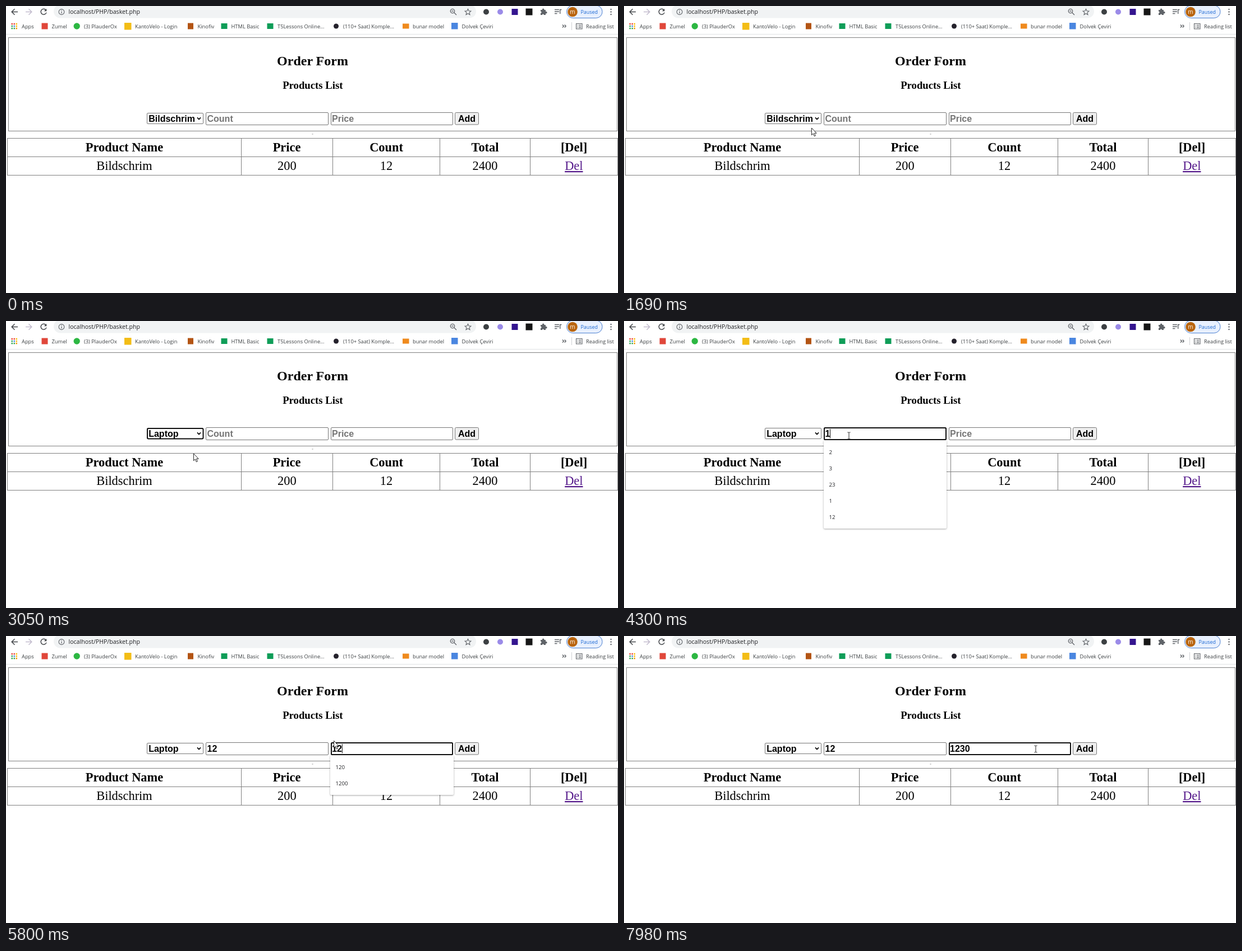
Animation of 1091x513 px, one loop 8000 ms. Source, as an HTML page:

```html
<!DOCTYPE html>
<html lang="en">
<head>
<meta charset="utf-8">
<title>Order Form</title>
<style>
  html, body { margin: 0; width: 100%; height: 100%; overflow: hidden; background: #fff; }
  svg { display: block; }
  .ui { font: 9.3px "Open Sans", "Noto Sans", sans-serif; fill: #3c4043; }
  .url { font-size: 10.6px; fill: #202124; }
  .page { font: 22.4px "Liberation Serif", Times, serif; text-anchor: middle; }
  .bold { font-weight: bold; }
  .form { font: bold 16px "Liberation Sans", Arial, sans-serif; }
  .hint { fill: #757575; }
  .line { fill: none; stroke: #808080; }
  .field { fill: #fff; stroke: #767676; }
  .ring { fill: none; stroke: #101010; stroke-width: 2; }
  .icon { fill: none; stroke: #5f6368; stroke-width: 1.5; }
  .list { font: 9.6px "Open Sans", "Noto Sans", sans-serif; fill: #202124; }
  .sheet { fill: #fff; filter: drop-shadow(0 1px 1.5px rgba(0, 0, 0, .35)); }
</style>
</head>
<body>
<svg width="1091" height="513" viewBox="0 0 1091 513">
  <!-- toolbar -->
  <rect x="85" y="-2" width="753" height="23.5" rx="11.7" fill="#f1f3f4"/>
  <g class="icon">
    <path d="M21 10.5H10.5M15.5 5.2L10.2 10.5L15.5 15.8" stroke="#44474b"/>
    <path d="M35 10.5H45.5M40.5 5.2L45.8 10.5L40.5 15.8" stroke="#c3bcce"/>
    <path d="M71.2 7.2A5 5 0 1 0 72 11.6" stroke="#44474b"/>
    <path d="M72.3 4.8V9.3H67.8Z" fill="#44474b" stroke="none"/>
    <circle cx="99" cy="10.5" r="4.9" stroke-width="1.1"/>
    <path d="M99 9.7V13.2M99 7.3V8.6" stroke-width="1.2"/>
    <circle cx="796" cy="9" r="3.7" stroke-width="1.3"/>
    <path d="M798.8 11.8L803 16M794.3 9H797.7" stroke-width="1.3"/>
    <path d="M823.5 5.3L825.1 8.8L828.9 9.2L826 11.7L826.9 15.5L823.5 13.5L820.1 15.5L821 11.7L818.1 9.2L821.9 8.8Z" stroke-width="1.1"/>
    <path d="M978 6.5H986M978 10H986M978 13.5H982.5M987.7 14V6.5H990.5" stroke-width="1.4"/>
  </g>
  <circle cx="856" cy="10.5" r="5" fill="#3c4043"/>
  <circle cx="881" cy="10.5" r="5" fill="#9b8be8"/>
  <rect x="901.5" y="5" width="11" height="11" fill="#34158f"/>
  <rect x="926.5" y="4.5" width="12" height="12" fill="#161616"/>
  <path d="M953 7H956A1.8 1.8 0 1 1 959.4 7H962V10A1.8 1.8 0 1 1 962 13.2V16H959A1.6 1.6 0 0 0 955.8 16H953V12.8A1.6 1.6 0 0 0 953 9.6Z" fill="#5f6368"/>
  <rect x="999.5" y="-1" width="63.5" height="22.5" rx="11.2" fill="#e8f0fe" stroke="#4a7fd0"/>
  <circle cx="1010" cy="10.5" r="8.8" fill="#b9650f"/>
  <g fill="#5f6368">
    <circle cx="1078.5" cy="6" r="1.2"/><circle cx="1078.5" cy="10.5" r="1.2"/><circle cx="1078.5" cy="15" r="1.2"/>
  </g>
  <g class="ui">
    <text class="url" x="111.5" y="14.2">localhost/PHP/basket.php</text>
    <text x="1010" y="13.6" text-anchor="middle" style="fill:#fff;font-size:10px">m</text>
    <text x="1024.5" y="13.7" style="fill:#1967d2;font-size:8.9px">Paused</text>
  </g>

  <!-- bookmarks -->
  <g id="dots"></g>
  <rect x="63.5" y="30.5" width="11" height="11" fill="#e0473a"/>
  <circle cx="126.2" cy="36" r="5.7" fill="#2cb742"/>
  <rect x="211" y="30" width="12.5" height="12.5" fill="#f3bd16"/>
  <rect x="324" y="30.5" width="10" height="11" fill="#b35413"/>
  <rect x="383.5" y="31" width="11" height="10" fill="#0f9d58"/>
  <rect x="465.5" y="31" width="11" height="10" fill="#0f9d58"/>
  <circle cx="588.5" cy="36" r="4.5" fill="#25222c"/>
  <rect x="707" y="31.5" width="11.5" height="9" fill="#ef8a1d"/>
  <rect x="794" y="30" width="11.5" height="11.5" fill="#4a86e0"/>
  <g class="ui">
    <text x="28" y="39.5">Apps</text>
    <text x="81.5" y="39.5">Zumel</text>
    <text x="139" y="39.5">(3) PlauderOx</text>
    <text x="230" y="39.5">KantoVelo - Login</text>
    <text x="341.5" y="39.5">Kinofiv</text>
    <text x="401.5" y="39.5">HTML Basic</text>
    <text x="484" y="39.5">T5Lessons Online...</text>
    <text x="601" y="39.5">(110+ Saat) Komple...</text>
    <text x="725" y="39.5">bunar model</text>
    <text x="812.5" y="39.5">Dolvek Çeviri</text>
    <text x="1034" y="39.5">Reading list</text>
  </g>
  <path class="icon" d="M992 33.5L994.3 36L992 38.5M995.7 33.5L998 36L995.7 38.5" stroke-width="1.2"/>
  <path d="M1008.5 29V43" stroke="#cfd1d4"/>
  <path class="icon" d="M1016.5 31.5H1027V41H1016.5ZM1018.3 34H1019.6M1018.3 36.3H1019.6M1018.3 38.6H1019.6M1021 34H1025.3M1021 36.3H1025.3M1021 38.6H1025.3" style="stroke-width:1.1"/>
  <path d="M0 50.5H1091" stroke="#dfe1e4"/>

  <!-- page -->
  <rect class="line" x="4.5" y="56.5" width="1085" height="167"/>
  <path d="M545.5 229H547.5" stroke="#909090"/>
  <path class="line" d="M2.5 236.5H1090.5V302H2.5ZM2.5 269H1090.5M419.5 236.5V302M582.5 236.5V302M773.5 236.5V302M934.5 236.5V302" shape-rendering="crispEdges"/>
  <g class="page">
    <g class="bold">
      <text x="546.5" y="105.5" style="font-size:24px">Order Form</text>
      <text x="546.8" y="148" style="font-size:18.72px">Products List</text>
      <text x="211" y="260">Product Name</text>
      <text x="500.5" y="260">Price</text>
      <text x="678" y="260">Count</text>
      <text x="854" y="260">Total</text>
      <text x="1012.5" y="260">[Del]</text>
    </g>
    <text x="211" y="293">Bildschrim</text>
    <text x="500.8" y="293">200</text>
    <text x="678" y="293">12</text>
    <text x="854" y="293">2400</text>
    <text x="1012.3" y="293" fill="#551a8b" text-decoration="underline">Del</text>
  </g>

  <!-- form -->
  <rect class="field" x="251.5" y="191.5" width="100" height="19" rx="1.5"/>
  <rect class="field" x="356.5" y="190.5" width="218" height="22" rx="1.5"/>
  <rect class="field" x="579.5" y="190.5" width="217" height="22" rx="1.5"/>
  <rect x="800.5" y="190.5" width="42" height="21.5" rx="2" fill="#efefef" stroke="#767676"/>
  <path d="M341 199.3L344 202.5L347 199.3" fill="none" stroke="#000" stroke-width="1.7"/>
  <rect class="ring" x="252" y="192" width="99.5" height="18.5" rx="2" data-on="1960-3720"/>
  <rect class="ring" x="357" y="191" width="217" height="21" rx="1.5" data-on="3720-5060"/>
  <rect class="ring" x="580" y="191" width="216" height="21" rx="1.5" data-on="5060-8000"/>
  <g class="form">
    <text id="pick" x="254.2" y="207"></text>
    <text id="count" x="358.5" y="207"></text>
    <text id="price" x="581" y="207"></text>
    <text x="806" y="207">Add</text>
  </g>
  <path id="caret" d="M0 193V209.5" stroke="#000"/>

  <!-- popups -->
  <g class="form" data-on="2150-2970">
    <rect class="sheet" x="251" y="212" width="101" height="121"/>
    <rect class="line" x="251.5" y="212.5" width="100" height="120"/>
    <rect id="mark" x="252" width="99" height="20" fill="#1967d2"/>
    <g id="options"></g>
  </g>
  <g id="list" class="list"></g>

  <g id="cursor">
    <path id="arrow" d="M.5 0V12.7L3.3 10L5.3 14.8L7.4 13.9L5.4 9.3H9.2Z" fill="#fff" stroke="#111" stroke-width=".9"/>
    <path id="beam" d="M-2.5 -6H-.7L0 -5.3L.7 -6H2.5M0 -5.3V5.3M-2.5 6H-.7L0 5.3L.7 6H2.5" fill="none" stroke="#222"/>
  </g>
</svg>
<script>
const LOOP = 8000, HOLD = 70;
const $ = id => document.getElementById(id);
const show = (el, on) => { el.style.visibility = on ? 'inherit' : 'hidden'; };
const stepAt = (steps, t) => steps.filter(s => s[0] <= t).pop()[1];
const setHtml = (el, html) => { if (el.dataset.html !== html) el.innerHTML = el.dataset.html = html; };

const picks = [[0, 'Bildschrim'], [2970, 'Laptop']];
const counts = [[0, ''], [4100, '1'], [4440, '12']];
const prices = [[0, ''], [5460, '1'], [5640, '12'], [6270, '123'], [7360, '1230']];
const options = ['Bildschrim', 'Laptop', 'Maus', 'Tastatur', 'Drucker', 'Kamera'];

// Filter prefix of the open suggestion list; null means closed
const countFilter = [[0, null], [3780, ''], [4370, '1'], [4510, '12'], [4700, null]];
const priceFilter = [[0, null], [5120, ''], [5530, '1'], [5730, '12'], [6540, null]];
const listAlpha = [[0, .5], [3850, 1], [5120, .6], [5190, 1], [6400, .6], [6470, .25]];
const listScale = [[0, 1], [6400, .98], [6470, .96]];

const caretOn = [[0, 0], [3720, 1], [4770, 0], [5060, 1], [6070, 0], [6270, 1],
  [6740, 0], [7090, 1], [7860, 0]];
const cursors = [[0, ''], [320, 'arrow'], [3640, 'beam'], [5660, 'arrow'], [7910, 'beam']];
const path = [
  [320, 706, 464], [560, 540, 320], [860, 322, 145], [1000, 320, 162], [1070, 326, 187],
  [1350, 334, 218], [1690, 334, 218], [1820, 334, 211], [2150, 334, 211], [2400, 334, 228],
  [2660, 334, 237], [3060, 334, 237], [3500, 380, 215], [3710, 401, 205], [4560, 401, 205],
  [4770, 560, 200], [4930, 575, 200], [5040, 593, 199], [5460, 593, 199], [5700, 584, 188],
  [5800, 584, 186], [6250, 584, 186], [6400, 580, 187], [7600, 580, 187], [7760, 640, 167],
  [7900, 724, 188], [7980, 734, 202]
];

function pointAt(t) {
  const i = path.findIndex(p => p[0] > t);
  if (i === 0) return path[0].slice(1);
  if (i < 0) return path[path.length - 1].slice(1);
  const [t0, x0, y0] = path[i - 1], [t1, x1, y1] = path[i];
  const k = (t - t0) / (t1 - t0);
  return [x0 + (x1 - x0) * k, y0 + (y1 - y0) * k];
}

function listHtml(x, w, items) {
  const rows = items.map((s, i) => `<text x="${x + 9.5}" y="${237.5 + 29 * i}">${s}</text>`);
  return `<rect class="sheet" x="${x}" y="213" width="${w}" height="${29 * items.length + 13}" rx="2"/>` + rows.join('');
}

function drawList(t) {
  const c = stepAt(countFilter, t), p = stepAt(priceFilter, t);
  const match = (all, prefix) => all.filter(s => s.startsWith(prefix));
  let html = '';
  if (c !== null) html = listHtml(356, 219, match(['2', '3', '23', '1', '12'], c));
  if (p !== null) html = listHtml(578, 220, match(['200', '120', '10', '20', '1200'], p));
  setHtml($('list'), html);
  $('list').style.opacity = stepAt(listAlpha, t);
  const s = stepAt(listScale, t);
  $('list').setAttribute('transform', `translate(688 248) scale(${s}) translate(-688 -248)`);
}

function drawForm(t) {
  const count = stepAt(counts, t), price = stepAt(prices, t), pick = stepAt(picks, t);
  $('pick').textContent = pick;
  $('count').textContent = count || 'Count';
  $('price').textContent = price || 'Price';
  $('count').classList.toggle('hint', !count);
  $('price').classList.toggle('hint', !price);

  const inPrice = t >= 5060, digits = (inPrice ? price : count).length;
  $('caret').setAttribute('transform', `translate(${(inPrice ? 581.5 : 358.5) + 8.9 * digits} 0)`);
  show($('caret'), stepAt(caretOn, t));

  const hover = t < 2560 ? 0 : 1;
  $('mark').setAttribute('y', 213 + 20 * hover);
  setHtml($('options'), options.map((s, i) =>
    `<text x="254.2" y="${229 + 20 * i}" fill="${i === hover ? '#fff' : '#000'}">${s}</text>`).join(''));
}

function drawCursor(t) {
  const kind = stepAt(cursors, t);
  show($('arrow'), kind === 'arrow');
  show($('beam'), kind === 'beam');
  $('cursor').setAttribute('transform', `translate(${pointAt(Math.floor(t / HOLD) * HOLD)})`);
}

const hues = ['#ea4335', '#ea4335', '#fbbc04', '#34a853', '#4285f4', '#fbbc04', '#34a853', '#34a853', '#f29900'];
$('dots').innerHTML = hues.map((c, i) =>
  `<rect x="${9.5 + i % 3 * 4}" y="${30.8 + Math.floor(i / 3) * 4}" width="2.5" height="2.5" fill="${c}"/>`).join('');

const timed = [...document.querySelectorAll('[data-on]')].map(el => [el, ...el.dataset.on.split('-').map(Number)]);
const start = performance.now();
function draw() {
  const t = (performance.now() - start) % LOOP;
  for (const [el, from, to] of timed) show(el, t >= from && t < to);
  drawForm(t);
  drawList(t);
  drawCursor(t);
  requestAnimationFrame(draw);
}
draw();
</script>
</body>
</html>
```
